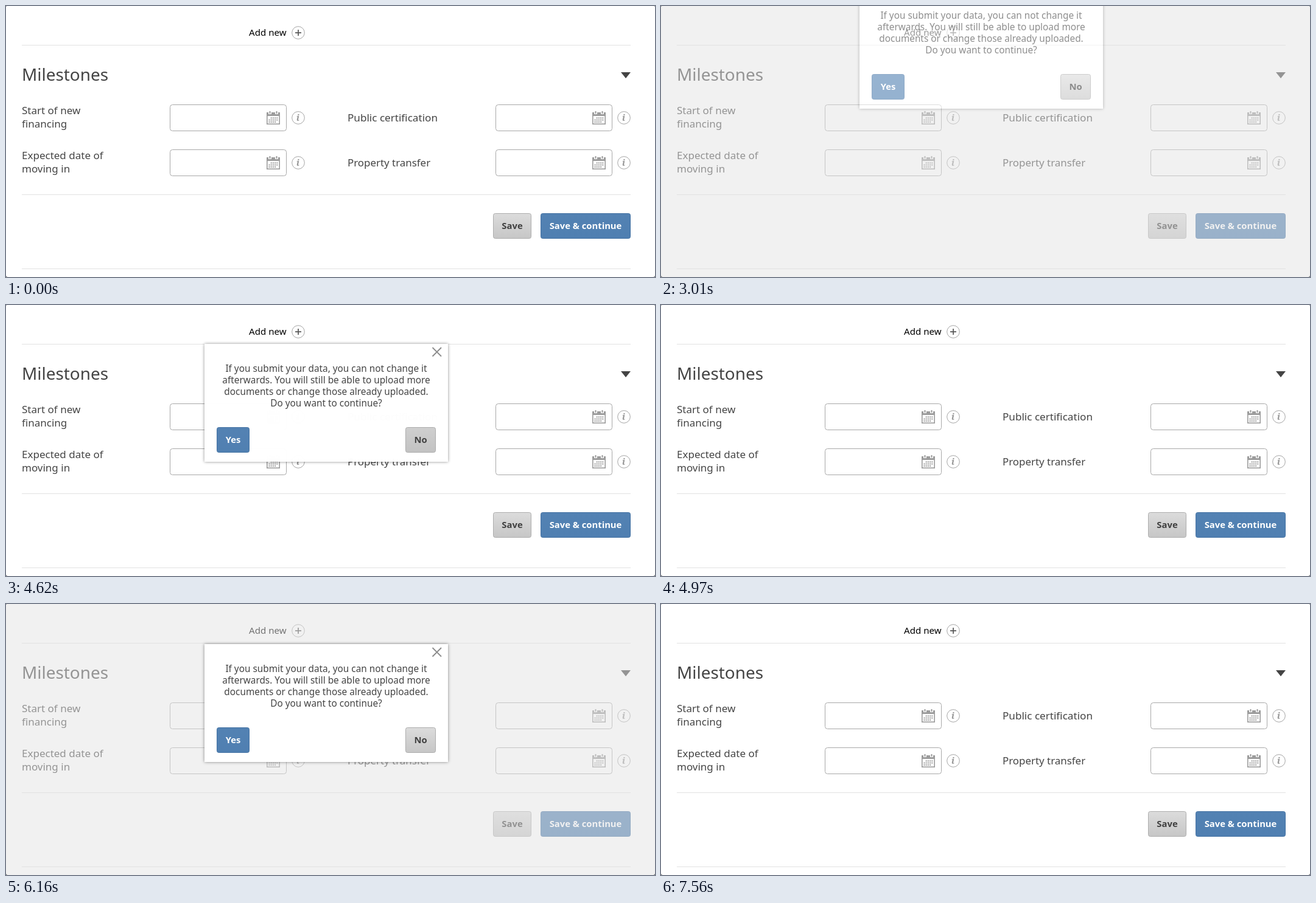
These frames come from a looping animation (1066x446 px, 8.47 s). An HTML page with a canvas:

```html
<!DOCTYPE html>
<html lang="en">
<head>
<meta charset="utf-8">
<title>Milestones form</title>
<style>
html, body { margin: 0; width: 100%; height: 100%; overflow: hidden; background: #fff; }
canvas { display: block; }
</style>
</head>
<body>
<canvas id="stage" width="1066" height="446"></canvas>
<script>
const W = 1066, H = 446, LOOP = 8470, STEP = 70;
const SANS = '"Noto Sans", "Open Sans", sans-serif';
const INK = '#444';
const BOX = { x: 326, y: 66, w: 400, h: 194 };
const PAD = 10, TRAVEL = 228, SLIDE = 250;

const RUNS = [
  { shade: 2940, open: 2860, close: 4618, end: 4760 },
  { shade: 5810, open: 5693, close: 7250, end: 7350, clear: 7210 }
];
RUNS[0].clear = 4620;

const stage = document.getElementById('stage').getContext('2d');

function layer(w, h, paint) {
  const canvas = document.createElement('canvas');
  canvas.width = w;
  canvas.height = h;
  paint(canvas.getContext('2d'));
  return canvas;
}

function text(c, str, x, y, size, color = INK, weight = 400, align = 'left') {
  c.font = `${weight} ${size}px ${SANS}`;
  c.fillStyle = color;
  c.textAlign = align;
  c.fillText(str, x, y);
}

function roundBox(c, x, y, w, h, r, fill, stroke) {
  c.beginPath();
  c.roundRect(x + .5, y + .5, w - 1, h - 1, r);
  c.fillStyle = fill;
  c.fill();
  c.strokeStyle = stroke;
  c.lineWidth = 1;
  c.stroke();
}

function button(c, label, x, y, w, blue, hover) {
  const h = 42;
  const fill = c.createLinearGradient(0, y, 0, y + h);
  const stops = blue
    ? (hover ? ['#4c7bad', '#4a79ab'] : ['#5382b3', '#4f7fb1'])
    : (hover ? ['#cfcfcf', '#c2c2c2'] : ['#dcdcdc', '#c6c6c6']);
  stops.forEach((s, i) => fill.addColorStop(i, s));
  roundBox(c, x, y, w, h, 3, fill, blue ? '#4472a3' : '#adadad');
  text(c, label, x + w / 2, y + 26, 14.8, blue ? '#fff' : '#404040', 600, 'center');
}

function rule(c, y) {
  c.fillStyle = '#e2e2e2';
  c.fillRect(26, y, 1000, 1);
}

function ring(c, x, y) {
  c.beginPath();
  c.arc(x, y, 10.3, 0, Math.PI * 2);
  c.strokeStyle = '#a6a6a6';
  c.lineWidth = 1;
  c.stroke();
}

function calendar(c, x, y) {
  c.fillStyle = c.strokeStyle = '#9c9c9c';
  c.lineWidth = 1.6;
  c.strokeRect(x + .8, y + 2.8, 20.4, 18.4);
  c.fillRect(x, y + 2, 22, 6);
  for (const dx of [4, 15]) {
    c.fillStyle = '#fff';
    c.fillRect(x + dx - 1, y, 5, 5);
    c.fillStyle = '#9c9c9c';
    c.fillRect(x + dx + .5, y, 2, 4);
  }
  for (let row = 0; row < 3; row++) {
    for (let col = 0; col < 5; col++) {
      if (row === 0 && col === 0 || row === 2 && col === 4) continue;
      c.fillRect(x + 3.5 + col * 3.2, y + 10.3 + row * 3.3, 2, 2);
    }
  }
}

function field(c, x, y) {
  roundBox(c, x, y, 192, 44, 4, '#fff', '#a8a8a8');
  calendar(c, x + 159, y + 11);
  ring(c, x + 211, y + 22);
  c.font = 'italic bold 15px "Noto Serif", "Liberation Serif", serif';
  c.fillStyle = '#999';
  c.textAlign = 'center';
  c.fillText('i', x + 210.5, y + 27);
}

function paintPage(c, hover) {
  c.fillStyle = '#fff';
  c.fillRect(0, 0, W, H);
  [64, 310, 432].forEach(y => rule(c, y));

  text(c, 'Add new', 399, 49, 15.1, '#000');
  ring(c, 480, 44);
  c.fillStyle = '#555';
  c.fillRect(475, 43.2, 10, 1.7);
  c.fillRect(479.2, 39, 1.7, 10);

  text(c, 'Milestones', 26, 123, 27.9);
  c.beginPath();
  c.moveTo(1010, 109);
  c.lineTo(1026, 109);
  c.lineTo(1018, 119);
  c.fill();

  text(c, 'Start of new', 26, 178, 17);
  text(c, 'financing', 26, 200, 17);
  text(c, 'Expected date of', 26, 252, 17);
  text(c, 'moving in', 26, 274, 17);
  text(c, 'Public certification', 561, 190, 17.1);
  text(c, 'Property transfer', 561, 264, 16.9);
  for (const x of [269, 804]) for (const y of [162, 236]) field(c, x, y);

  button(c, 'Save', 800, 341, 63, false);
  button(c, 'Save & continue', 878, 341, 148, true, hover);
}

function paintDialog(c, hover) {
  c.translate(PAD - BOX.x, PAD - BOX.y);
  c.shadowColor = 'rgba(0,0,0,.45)';
  c.shadowBlur = 5;
  c.fillStyle = '#fff';
  c.fillRect(BOX.x, BOX.y, BOX.w, BOX.h);
  c.shadowColor = 'transparent';

  c.strokeStyle = '#8c8c8c';
  c.lineWidth = 1.8;
  c.beginPath();
  c.moveTo(700.5, 72);
  c.lineTo(715, 86.5);
  c.moveTo(715, 72);
  c.lineTo(700.5, 86.5);
  c.stroke();

  [
    'If you submit your data, you can not change it',
    'afterwards. You will still be able to upload more',
    'documents or change those already uploaded.',
    'Do you want to continue?'
  ].forEach((line, i) => text(c, line, 526, 112 + i * 19, 15.35, INK, 400, 'center'));

  button(c, 'Yes', 346, 203, 54, true);
  button(c, 'No', 656, 203, 50, false, hover);
}

// Rounded window corners
function corners(c) {
  c.fillStyle = '#555';
  for (const x of [0, W]) {
    const d = x ? -1 : 1;
    for (const [y, s] of [[0, 1.5], [H, -3]]) {
      c.beginPath();
      c.moveTo(x, y);
      c.lineTo(x + d * Math.abs(s), y);
      c.quadraticCurveTo(x, y, x, y + s);
      c.fill();
    }
  }
}

const pages = [false, true].map(h => layer(W, H, c => paintPage(c, h)));
const dialogs = [false, true].map(h =>
  layer(BOX.w + PAD * 2, BOX.h + PAD * 2, c => paintDialog(c, h)));

const between = (t, a, b) => t >= a && t < b;
const progress = (t, start) => Math.min(1, Math.max(0, (t - start) / SLIDE));

function draw(t) {
  const hoverSave = between(t, 2240, 2940) || between(t, 5600, 5810);
  const hoverNo = between(t, 3920, 4760);
  stage.drawImage(pages[+hoverSave], 0, 0);

  const run = RUNS.find(r => between(t, r.shade, r.end));
  if (run) {
    const shown = progress(t, run.open) - progress(t, run.close);
    const lift = Math.round(TRAVEL * (1 - shown));
    if (t < run.clear) {
      stage.beginPath();
      stage.rect(0, 0, W, H);
      stage.rect(BOX.x, BOX.y - lift, BOX.w, BOX.h);
      stage.fillStyle = 'rgba(228,228,228,.5)';
      stage.fill('evenodd');
    }
    stage.globalAlpha = shown;
    stage.drawImage(dialogs[+hoverNo], BOX.x - PAD, BOX.y - PAD - lift);
    stage.globalAlpha = 1;
  }
  corners(stage);
}

const begin = performance.now();
function tick() {
  const t = (performance.now() - begin) % LOOP;
  draw(Math.floor(t / STEP) * STEP);
  requestAnimationFrame(tick);
}
tick();
</script>
</body>
</html>
```
